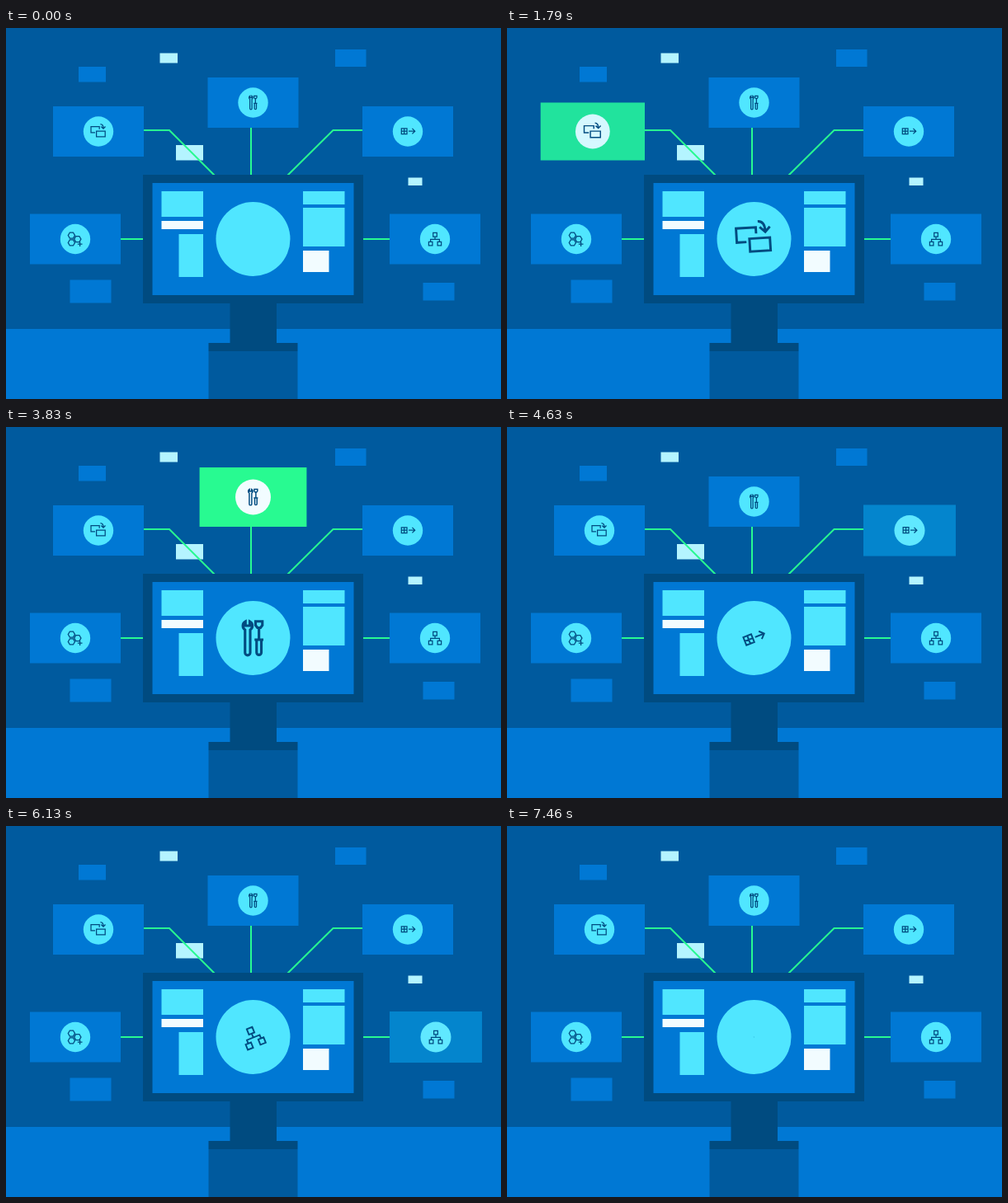
Recreate the animation shown at these times as an HTML page with a canvas. Size 600 by 450 pixels, loop 7.5 s.

```html
<!DOCTYPE html>
<html lang="en">
<head>
<meta charset="utf-8">
<title>Connected workspace</title>
<style>
html, body { margin: 0; width: 100%; height: 100%; overflow: hidden; background: #005a9e; }
canvas { display: block; }
</style>
</head>
<body>
<canvas id="stage" width="600" height="450"></canvas>
<script>
const ctx = document.getElementById('stage').getContext('2d');
const SLOT = 1500, CARD_W = 110, CARD_H = 61;
const NAVY = '#004b80', DEEP = '#005a9e', BLUE = '#0078d4';
const CYAN = '#50e6ff', PALE = '#b4f4ff', WHITE = '#f2fcff', GREEN = '#28fa91';

function hexagon(x, y, r = 4.1) {
  let d = '';
  for (let i = 0; i < 6; i++) {
    const a = i * Math.PI / 3;
    d += `${i ? 'L' : 'M'}${x + r * Math.cos(a)} ${y + r * Math.sin(a)}`;
  }
  return d + 'Z';
}

// Icon paths are centred on the origin.
const icons = {
  hexes: hexagon(-4.6, -4.4) + hexagon(2.8, 0.1) + hexagon(-4.6, 4.4) + 'M2.8 6.1H8.5M5.6 3.2V9',
  windows: 'M-4 1.3H-9V-6H1.2V-2.8M-2.4-.3H8.2V6.3H-2.4ZM2.4-9Q6-9 6-3.8M3.2-6L6-3.4L8.5-6',
  tools: 'M-3.7-8.1A2.4 2.4 0 0 0-3.9-4V7.1a1.25 1.25 0 0 0 2.5 0V-4A2.4 2.4 0 0 0-1.6-8.1V-6H-3.7Z' +
    'M1.2-8.1H4.5V-6.2L3.6-5H2.1L1.2-6.2ZM2.85-5V.7M.7.8H5M1.7.8V7a1.15 1.15 0 0 0 2.3 0V.8',
  move: 'M-7.7-3.7H-1V3H-7.7ZM-4.35-3.7V3M-7.7-.35H-1M1-.35H8.7M5.4-3.6L8.7-.35L5.4 2.9',
  tree: 'M-2.3-7.6H2.3V-3H-2.3ZM-7.6 3.3H-3.1V7.8H-7.6ZM3.1 3.3H7.6V7.8H3.1ZM0-3V.4M-5.4 3.3V.4H5.4V3.3'
};

// Centre of each card, and the side it grows from.
const cards = [
  { x: 84, y: 256, ox: 1, oy: 0, icon: 'hexes' },
  { x: 112, y: 125.5, ox: 1, oy: 0, icon: 'windows' },
  { x: 299.5, y: 90.5, ox: 0, oy: 1, icon: 'tools' },
  { x: 487, y: 125.5, ox: -1, oy: 0, icon: 'move' },
  { x: 520, y: 256, ox: -1, oy: 0, icon: 'tree' }
].map(c => ({ ...c, path: new Path2D(icons[c.icon]) }));

const links = new Path2D('M139 256H166M167 124H198L254 180M297 121V180M432 124H396.5L340 180M433 256H465');

const unit = v => Math.min(1, Math.max(0, v));
const inOut = x => x < 0.5 ? 4 * x ** 3 : 1 - 4 * (1 - x) ** 3;

function mix(a, b, p) {
  const part = (s, i) => parseInt(s.slice(i, i + 2), 16);
  return `rgb(${[1, 3, 5].map(i => Math.round(part(a, i) + (part(b, i) - part(a, i)) * p))})`;
}

function box(color, x1, y1, x2, y2) {
  ctx.fillStyle = color;
  ctx.fillRect(x1, y1, x2 - x1, y2 - y1);
}

function disc(color, x, y, r) {
  ctx.fillStyle = color;
  ctx.beginPath();
  ctx.arc(x, y, r, 0, 2 * Math.PI);
  ctx.fill();
}

function drawIcon(path) {
  ctx.strokeStyle = NAVY;
  ctx.lineWidth = 1.25;
  ctx.stroke(path);
}

function drawCard(card, p) {
  const s = 1 + 0.18 * p;
  ctx.save();
  ctx.translate(card.x + card.ox * CARD_W / 2 * (1 - s), card.y + card.oy * CARD_H / 2 * (1 - s));
  ctx.scale(s, s);
  box(mix(BLUE, GREEN, p), -CARD_W / 2, -CARD_H / 2, CARD_W / 2, CARD_H / 2);
  disc(mix(CYAN, WHITE, p), 0, 0, 18.2);
  drawIcon(card.path);
  ctx.restore();
}

function drawRoom() {
  box(DEEP, 0, 0, 600, 365);
  box(BLUE, 0, 365, 600, 450);
  box(BLUE, 88, 47, 121, 65.5);
  box(BLUE, 399, 26, 436.5, 47);
  box(BLUE, 77.5, 305.5, 127.5, 333.5);
  box(BLUE, 505.5, 309, 543.5, 330.5);
  box(PALE, 186.5, 30.5, 208, 42.5);
  box(PALE, 206, 142, 239, 160.5);
  box(PALE, 487.5, 181.5, 504.5, 191);
  ctx.strokeStyle = GREEN;
  ctx.lineWidth = 2;
  ctx.stroke(links);
}

function drawMonitor() {
  box(NAVY, 166, 178, 433, 334);
  box(BLUE, 177.5, 188, 421.5, 324);
  box(NAVY, 271.5, 334, 328, 382);
  box(NAVY, 245.5, 382, 353.5, 392);
  box(DEEP, 245.5, 392, 353.5, 450);
  box(CYAN, 188.5, 198, 239, 229);
  box(WHITE, 188.5, 234, 239, 244);
  box(CYAN, 209.5, 250, 239, 302);
  box(CYAN, 360, 198, 410.5, 214);
  box(CYAN, 360, 218, 410.5, 265);
  box(WHITE, 360, 270, 391.5, 296);
  disc(CYAN, 299.5, 256, 45);
}

function drawFeature(path, t) {
  const enter = 1 - (1 - unit(t / 480)) ** 3;
  const leave = unit((t - 1000) / 465) ** 3;
  const size = 2.5 * (enter - leave);
  if (size <= 0) return;
  ctx.save();
  ctx.translate(299.5, 256);
  ctx.rotate((enter - 1 + leave) * 57 * Math.PI / 180);
  ctx.scale(size, size);
  drawIcon(path);
  ctx.restore();
}

function draw(now) {
  const time = now % (SLOT * cards.length);
  const active = Math.floor(time / SLOT), t = time % SLOT;
  const grow = inOut(unit(t / 450)) - inOut(unit((t - 1008) / 450));
  drawRoom();
  cards.forEach((card, i) => drawCard(card, i === active ? grow : 0));
  drawMonitor();
  drawFeature(cards[active].path, t);
}

const start = performance.now();
function frame() {
  draw(performance.now() - start);
  requestAnimationFrame(frame);
}
frame();
</script>
</body>
</html>
```
